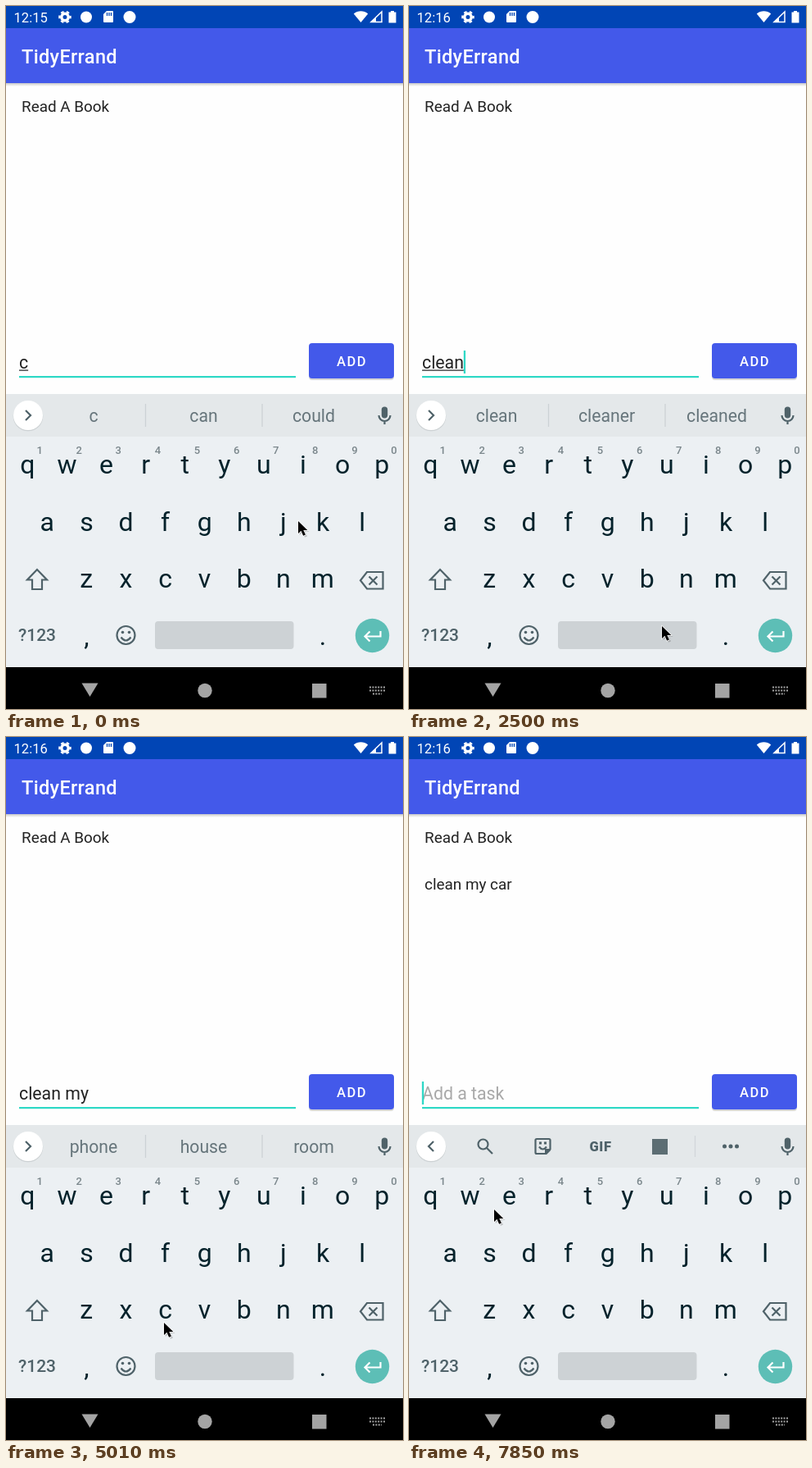
An HTML page that plays this animation: 485x857 px, repeating every 8000 ms.

```html
<!DOCTYPE html>
<html lang="en">
<head>
<meta charset="utf-8">
<title>To-do list</title>
<style>
  html, body { margin: 0; width: 100%; height: 100%; overflow: hidden; background: #fefefe; }
  svg { display: block; width: 100%; height: 100%; }
  text { font-family: Roboto, sans-serif; white-space: pre; }
  .medium { font-weight: 500; }
  .mid { text-anchor: middle; }
  .line { fill: none; stroke: #4f6269; stroke-width: 2.2; }
  .key { font-size: 32px; fill: #04222b; }
  .digit { font-size: 13px; fill: #7a868b; font-weight: 500; }
  .word { font-size: 21.2px; fill: #66757b; }
  .word.bold { font-weight: 700; fill: #050505; }
  .item { font-size: 18.9px; fill: #222; }
</style>
</head>
<body>
<svg viewBox="0 0 485 857" preserveAspectRatio="none">
  <defs>
    <linearGradient id="shade" x2="0" y2="1">
      <stop stop-color="#bbb"/><stop offset="1" stop-color="#fefefe"/>
    </linearGradient>
  </defs>
  <rect width="485" height="857" fill="#fefefe"/>
  <rect y="93" width="485" height="5" fill="url(#shade)"/>
  <rect y="26" width="485" height="68" fill="#4359ea"/>
  <rect width="485" height="27" fill="#0145b5"/>

  <g fill="#fff">
    <text id="clock" x="9.5" y="20" font-size="16.6"></text>
    <circle cx="72" cy="13.5" r="4.2" fill="none" stroke="#fff" stroke-width="3.4"/>
    <circle cx="72" cy="13.5" r="6.6" fill="none" stroke="#fff" stroke-width="2.4" stroke-dasharray="3.6 3.31" stroke-dashoffset="1.8"/>
    <circle cx="98" cy="13.5" r="7"/>
    <path d="M123 6h7q1 0 1 1v12q0 1-1 1h-10q-1 0-1-1v-9z"/>
    <path d="M123.5 8v4m2.5-4v4m2.5-4v4" stroke="#0145b5" stroke-width="1.3"/>
    <circle cx="151" cy="13.5" r="7.5"/>
    <path d="M433.5 20l-8.7-10.6a13.5 13.5 0 0 1 17.4 0z"/>
    <path d="M459 7v12.5h-13z" fill="none" stroke="#fff" stroke-width="1.5"/>
    <path d="M452 14v6h-7z"/>
    <path d="M470 6h4v1.5h2.5v13h-9v-13h2.5z"/>
    <text class="medium" x="19" y="70" font-size="23.6" letter-spacing=".3">TidyErrand</text>
  </g>

  <text class="item" x="19" y="129">Read A Book</text>
  <text class="item" id="added" x="19" y="186">clean my car</text>

  <text id="field" x="16" y="442" font-size="21.3"></text>
  <rect id="under" y="443.5" height="1.2" fill="#222"/>
  <rect x="16" y="451" width="338" height="2.2" fill="#2ed8c6"/>
  <rect id="caret" y="420" width="2.3" height="28" fill="#2ed8c6"/>

  <rect x="370" y="413" width="104" height="43" rx="4" fill="#000" opacity=".16"/>
  <rect id="button" x="370" y="411" width="104" height="43" rx="4"/>
  <text class="medium" x="404" y="439" font-size="16.5" letter-spacing="1.5" fill="#fff">ADD</text>

  <rect y="473" width="485" height="53" fill="#e4e8ea"/>
  <rect y="525" width="485" height="282" fill="#ecf0f3"/>
  <circle cx="27" cy="500" r="18.3" fill="#ccd1d3"/>
  <circle cx="27" cy="499" r="18" fill="#fff"/>
  <path id="chevron" class="line"/>
  <g fill="#4f6269">
    <rect x="458.8" y="488.5" width="7.4" height="14" rx="3.7"/>
    <path class="line" stroke-width="2" d="M455.5 499a7 7 0 0 0 14 0m-7 7v4"/>
  </g>

  <g id="words">
    <path d="M170.5 485v28M313 485v28" stroke="#ccd2d5" stroke-width="1.3"/>
    <text class="word mid" x="107" y="507"></text>
    <text class="word mid" x="241.5" y="507"></text>
    <text class="word mid" x="376" y="507"></text>
  </g>
  <g id="tools">
    <path d="M349.5 486v26" stroke="#d2d7da" stroke-width="1.3"/>
    <circle class="line" cx="90.5" cy="496.5" r="6"/>
    <path class="line" stroke-width="2.6" d="M95 501l7 7"/>
    <path class="line" d="M156 490h15q1.5 0 1.5 1.5v11l-5.500 5.500h-11q-1.500 0-1.500-1.500v-15q0-1.500 1.500-1.500z"/>
    <path class="line" d="M159 499.500q4.500 6 9 0"/>
    <path fill="#4f6269" d="M159 493.500h3v3h-3zm6 0h3v3h-3zM173 502v2l-5 5h-2v-7z"/>
    <text class="mid" x="234" y="505" font-size="16.500" font-weight="900" letter-spacing=".6" fill="#4f6269">GIF</text>
    <rect x="297" y="490" width="19" height="19" fill="#5c6d73"/>
    <g fill="#4f6269"><circle cx="385.500" cy="499" r="2.500"/><circle cx="393" cy="499" r="2.500"/><circle cx="400.500" cy="499" r="2.500"/></g>
  </g>

  <g id="keys"></g>
  <path class="line" d="M38 687l-12 12.500h6v11.500h12v-11.500h6z"/>
  <path class="line" d="M441 690h19.500v20.500h-19.500l-8-10.250zM443.500 695.500l10 10m0-10l-10 10"/>
  <text class="medium" x="15" y="774" font-size="21" fill="#4f6269">?123</text>
  <text class="key mid" x="98.500" y="779" font-size="30">,</text>
  <text class="key mid" x="387" y="779" font-size="30">.</text>
  <circle class="line" cx="146.500" cy="767" r="11"/>
  <path class="line" d="M140.500 769.500q6 8 12 0"/>
  <circle cx="142.500" cy="763.500" r="1.800" fill="#4f6269"/>
  <circle cx="150.500" cy="763.500" r="1.800" fill="#4f6269"/>
  <rect x="182" y="750" width="169.500" height="34" rx="4" fill="#cdd2d5"/>
  <circle cx="447.500" cy="767.500" r="20.700" fill="#5dbeb6"/>
  <path d="M457.500 762v6.500h-19m6-6l-6 6 6 6" fill="none" stroke="#fff" stroke-width="2.200"/>

  <rect y="806" width="485" height="51"/>
  <g fill="#a4a4a4">
    <path d="M92.500 825.500h20l-10 16.500z"/>
    <circle cx="243" cy="834.500" r="8.700"/>
    <rect x="374" y="826" width="17.500" height="17.500"/>
    <path d="M444 830.500h19M444 834.500h19M448 838.500h11" stroke="#a4a4a4" stroke-width="2" stroke-dasharray="2 1.400"/>
  </g>

  <g id="mouse">
    <path d="M1 1v15l3.600-3.200 2.700 6 3-1.300-2.700-5.700h5.200z" transform="translate(.7 1)" opacity=".2"/>
    <path d="M0 0v15l3.500-3.200 2.600 6 2.800-1.200-2.600-5.600h5z" stroke="#fff" stroke-width="1.300" paint-order="stroke"/>
  </g>
</svg>
<script>
const $ = id => document.getElementById(id);
const LOOP = 8000, TICK = 148, BLINK = 3.4;

// Typing steps: start tick, field text, suggestions
const steps = [
  [-4, 'c', 'c can could'],
  [1, 'cl', 'cl close class'],
  [5, 'cle', 'cle clear clean'],
  [10, 'clea', 'clea *clean Clea'],
  [15, 'clean', 'clean cleaner cleaned'],
  [19, 'clean ', 'the my up'],
  [21, 'clean m', 'm my myself'],
  [24, 'clean my', 'my myself mystery'],
  [30.5, 'clean my ', 'phone house room'],
  [37, 'clean my ca', 'ca can car'],
  [37.5, 'clean my car', 'car card Car'],
  [43, '', '']
];

// Pointer path: tick, x, y
const path = [
  [0, 357, 628], [4, 122, 566], [5, 120, 564], [7, 0, 612], [8, 40, 627],
  [10, 46, 627], [13, 290, 680], [14, 329, 686], [15, 333, 690], [16, 315, 736],
  [17, 309, 756], [18, 309, 756], [20, 380, 702], [21, 384, 698], [22, 333, 629],
  [24, 262, 566], [25, 257, 562], [26, 250, 640], [28, 247, 772], [29, 245, 767],
  [31, 245, 767], [32, 194, 715], [33, 194, 715], [34, 193, 714], [36, 193, 714],
  [37, 80, 625], [38, 165, 562], [39, 312, 549], [40, 395, 455], [41, 417, 425],
  [42, 417, 425], [45, 419, 422], [46, 419, 424], [49, 182, 606], [50, 150, 623],
  [53, 104, 576]
];

const label = (cls, x, y, s) => `<text class="${cls} mid" x="${x}" y="${y}">${s}</text>`;
$('keys').innerHTML = ['qwertyuiop', 'asdfghjkl', 'zxcvbnm'].map((row, r) =>
  [...row].map((c, i) => {
    const x = 26.3 + 24 * [0, 1, 3][r] + 48.1 * i;
    return label('key', x, 570 + 69.5 * r, c) +
      (r ? '' : label('digit', x + 14.8, 546, (i + 1) % 10));
  }).join('')).join('');

const field = $('field'), slots = document.querySelectorAll('.word');
const show = (id, on) => $(id).setAttribute('visibility', on ? 'visible' : 'hidden');
const textWidth = n => n ? field.getSubStringLength(0, n) : 0;

function pointerAt(tick) {
  const i = path.findIndex(p => p[0] > tick);
  if (i < 0) return path.at(-1).slice(1);
  const [t0, x0, y0] = path[i - 1], [t1, x1, y1] = path[i];
  const f = (tick - t0) / (t1 - t0);
  return [x0 + (x1 - x0) * f, y0 + (y1 - y0) * f].map(Math.round);
}

function render(tick) {
  const [start, typed, hints] = steps.findLast(s => s[0] <= tick);
  const sent = !typed;
  $('clock').textContent = tick < 16 ? '12:15' : '12:16';

  field.textContent = typed || 'Add a task';
  field.setAttribute('fill', sent ? '#a9a9a9' : '#222');
  const wordStart = textWidth(typed.lastIndexOf(' ') + 1), end = textWidth(typed.length);
  $('under').setAttribute('x', 16 + wordStart);
  $('under').setAttribute('width', Math.max(0, end - wordStart));
  $('caret').setAttribute('x', 15.8 + end);
  show('caret', Math.floor((tick - start) / BLINK) % 2 === 0);

  hints.split(' ').forEach((word, i) => {
    slots[i].textContent = word.replace('*', '');
    slots[i].classList.toggle('bold', word[0] === '*');
  });
  show('words', !sent);
  show('tools', sent);
  show('added', sent);
  $('chevron').setAttribute('d', sent ? 'M30 493l-6 6 6 6' : 'M24 493l6 6-6 6');
  $('button').setAttribute('fill', tick >= 43 && tick < 47 ? '#5f5ce8' : '#4359ea');
  $('mouse').setAttribute('transform', `translate(${pointerAt(tick)})`);
}

let last = -1;
function frame() {
  const tick = Math.min(53, Math.floor((performance.now() % LOOP + 24) / TICK));
  if (tick !== last) render(last = tick);
  requestAnimationFrame(frame);
}
frame();
</script>
</body>
</html>
```
